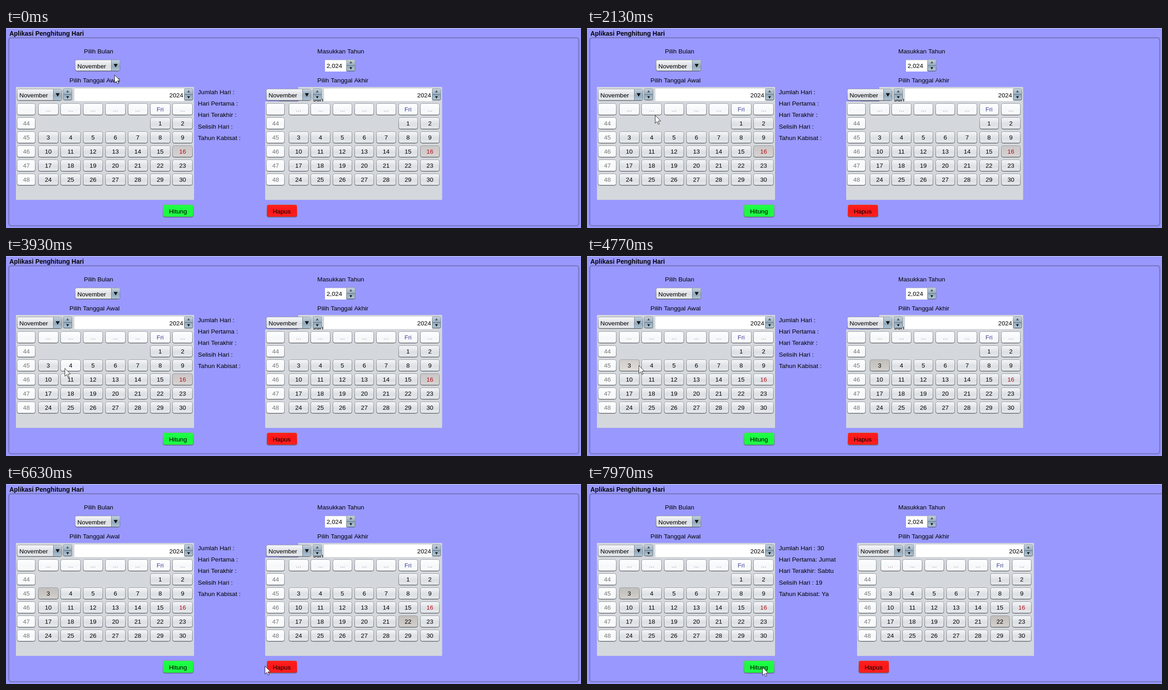
Write an HTML page with a canvas that moves like this. It is 1269 px wide and 441 px high and loops after 8000 ms.

```html
<!DOCTYPE html>
<html lang="id">
<head>
<meta charset="utf-8">
<title>Aplikasi Penghitung Hari</title>
<style>
html, body { margin: 0; width: 1269px; height: 441px; overflow: hidden; background: #9898ff; }
canvas { display: block; }
</style>
</head>
<body>
<canvas id="stage" width="1269" height="441"></canvas>
<script>
const ctx = document.getElementById('stage').getContext('2d');
const LOOP = 8000, START_PICK = 4500, END_PICK = 5900, COUNTED = 7500;
const FONT = '"Liberation Sans", Arial, sans-serif';
const BACK = '#9898ff';

const SKINS = {
  day: ['#f7f8fa', '#dcdfe3', '#e9ecef'],
  pale: ['#ffffff', '#f5f7f9', '#ffffff'],
  hover: ['#ffffff', '#f4f5f7', '#ffffff'],
  today: ['#cbc7c7', '#d2cdcd', '#dad5d5'],
  picked: ['#c1bfbc', '#cac7c3', '#d6d4d0'],
  pickedHover: ['#d0ceca', '#d9d6d2', '#e3e0dc'],
  arrow: ['#c5d3df', '#92a9bb', '#b5cad9'],
  go: ['#20ff4c', '#18fa3e', '#24ff4c'],
  clear: ['#ff2020', '#fb1616', '#ff2424']
};

// Pointer tip: time, x, y
const PATH = [
  [0, 239, 103], [1030, 299, 120], [2130, 150, 192], [3100, 265, 265],
  [4250, 98, 243], [4500, 98, 243], [4770, 114, 241], [5700, 894, 306],
  [5950, 892, 305], [6630, 571, 401], [7200, 386, 404], [8000, 387, 404]
];

function pointerAt(t) {
  const i = PATH.findIndex(p => p[0] > t);
  const [a, b] = [PATH[i - 1], PATH[i]];
  const u = (t - a[0]) / (b[0] - a[0]), k = u * u * (3 - 2 * u);
  return [a[1] + (b[1] - a[1]) * k, a[2] + (b[2] - a[2]) * k];
}

function rect(x, y, w, h, color) {
  ctx.fillStyle = color;
  ctx.fillRect(x, y, w, h);
}

function text(s, x, mid, { align = 'left', color = '#000', size = 13.7, bold = '' } = {}) {
  ctx.font = `${bold} ${size}px ${FONT}`;
  ctx.textAlign = align;
  ctx.fillStyle = color;
  ctx.fillText(s, x, Math.round(mid + 5));
}

function shade(y, h, [top, mid, low]) {
  const g = ctx.createLinearGradient(0, y, 0, y + h);
  g.addColorStop(0, top);
  g.addColorStop(0.55, mid);
  g.addColorStop(1, low);
  return g;
}

function outline(x, y, w, h, r, color, width = 1) {
  ctx.beginPath();
  ctx.roundRect(x, y, w, h, r);
  ctx.lineWidth = width;
  ctx.strokeStyle = color;
  ctx.stroke();
}

// The lowest pixel row is the shadow; edges sit on whole pixels.
function box(left, y, width, h, skin, r = 4) {
  const x = Math.round(left), w = Math.round(left + width) - x;
  outline(x + 0.5, y + 1.5, w - 1, h - 2, r, 'rgba(50,55,65,.35)');
  ctx.beginPath();
  ctx.roundRect(x + 0.5, y + 0.5, w - 1, h - 2, r);
  ctx.fillStyle = shade(y, h, SKINS[skin]);
  ctx.fill();
  ctx.strokeStyle = shade(y, h, ['#989ca3', '#83878d', '#5c6066']);
  ctx.stroke();
}

function triangle(x, y, dir, size = 4, color = '#111') {
  ctx.beginPath();
  ctx.moveTo(x - size, y - dir * size * 0.7);
  ctx.lineTo(x + size, y - dir * size * 0.7);
  ctx.lineTo(x, y + dir * size);
  ctx.fillStyle = color;
  ctx.fill();
}

function combo(x, y, h) {
  box(x, y, 100, h, 'day');
  ctx.beginPath();
  ctx.roundRect(x + 81, y + 1, 18, h - 3, [0, 3, 3, 0]);
  ctx.fillStyle = shade(y, h, SKINS.arrow);
  ctx.fill();
  rect(x + 80, y + 1, 1, h - 3, '#6f8396');
  triangle(x + 90, y + h / 2 - 0.5, 1, 4.5);
  text('November', x + 5.5, y + h / 2 + 0.5);
}

function spinner(x, y) {
  box(x, y, 20, 27, 'arrow', 3);
  rect(x + 1, y + 13, 18, 1, '#5d7182');
  triangle(x + 10, y + 7, -1, 3, '#555');
  triangle(x + 10, y + 19.5, 1, 3);
}

function field(x, y, w, h) {
  rect(x, y, w, h, '#fff');
  rect(x, y, w, 1, '#b9bdc6');
}

function calendar(cal, dx, picked, pointer, stale) {
  const x0 = cal.x + dx;
  rect(x0, 130, cal.w, 249, '#d4d8dc');
  if (stale) residue(x0);
  field(x0 + cal.year, 132, cal.spin - cal.year, 29);
  text('2024', x0 + cal.spin - 2, 147.5, { align: 'right' });
  spinner(x0 + cal.spin, 133);
  spinner(x0 + cal.year - 25, 133);
  combo(x0 + 2, 134, 27);

  for (let row = 0; row < 6; row++) {
    const y = Math.round(166 + row * 30.9), mid = y + 13;
    box(x0 + 2, y, 41, 27, 'pale');
    if (row) text(43 + row, x0 + 23, mid, { align: 'center', color: '#777', size: 13.5 });

    for (let col = 0; col < 7; col++) {
      const x = x0 + cal.first + col * cal.pitch, w = cal.cell;
      const day = row * 7 + col - 11;
      const center = { align: 'center', size: 13.5 };
      if (!row) {
        box(x, y, w, 27, 'pale');
        const color = col === 5 ? '#46469a' : col ? '#77859a' : '#98717d';
        text(col === 5 ? 'Fri' : '...', x + w / 2, mid, { ...center, color });
      } else if (day > 0) {
        const over = pointer[0] >= x && pointer[0] <= x + w + 2 &&
                     pointer[1] >= y && pointer[1] <= y + 27;
        const chosen = day === 16 ? 'today' : over ? 'pickedHover' : 'picked';
        box(x, y, w, 27, day === picked ? chosen : over ? 'hover' : 'day');
        text(day, x + w / 2, mid, { ...center, color: day === 16 ? '#b01018' : '#000' });
      }
    }
  }
}

const LEFT = { x: 22, w: 393, year: 129, spin: 371, first: 49, pitch: 49.4, cell: 44.5 };
const RIGHT = { x: 572, w: 390.5, year: 130, spin: 368, first: 52, pitch: 48.3, cell: 43.5 };

// Unrepainted corner behind the second month chooser
function residue(x) {
  rect(x, 130, 73, 32, BACK);
  rect(x + 31, 161, 42, 1, '#73777d');
  ctx.save();
  ctx.beginPath();
  ctx.rect(x + 106, 156, 22, 6);
  ctx.clip();
  text('Jun', x + 106, 156.5);
  ctx.restore();
}

function drawPointer(x, y) {
  ctx.beginPath();
  [[0, 0], [0, 17.5], [4, 13.8], [6.7, 20], [9.3, 18.8], [6.6, 12.8], [12.2, 12.4]]
    .forEach(([px, py]) => ctx.lineTo(x + 0.5 + px, y + 0.5 + py));
  ctx.closePath();
  ctx.fillStyle = '#fff';
  ctx.fill();
  ctx.lineWidth = 1;
  ctx.strokeStyle = '#222';
  ctx.stroke();
}

function draw(t) {
  const counted = t >= COUNTED, dx = counted ? 24 : 0, pointer = pointerAt(t);
  const begin = t < START_PICK ? 16 : 3;
  const end = t < END_PICK ? begin : 22;

  rect(0, 0, 1269, 441, BACK);
  rect(0, 0, 1269, 1, '#d2d3e4');
  outline(6, 21.5, 1258 + dx, 414.5, 5, '#8585d8', 3);
  outline(6, 21.5, 1258 + dx, 414.5, 5, '#7272b8', 1.2);

  text('Aplikasi Penghitung Hari', 7.5, 12, { bold: 'bold', size: 13.9 });
  text('Pilih Bulan', 172, 51);
  text('Masukkan Tahun', 687, 51);
  text('Pilih Tanggal Awal', 140, 115);
  text('Pilih Tanggal Akhir', 687, 115);
  combo(152, 70, 26);
  field(704, 70, 47, 26);
  text('2,024', 707.5, 83);
  spinner(751, 69);

  const labels = counted
    ? ['Jumlah Hari : 30', 'Hari Pertama: Jumat', 'Hari Terakhir: Sabtu', 'Selisih Hari : 19', 'Tahun Kabisat: Ya']
    : ['Jumlah Hari :', 'Hari Pertama :', 'Hari Terakhir :', 'Selisih Hari :', 'Tahun Kabisat :'];
  labels.forEach((s, i) => text(s, 423.5, 141 + i * 25.2));

  calendar(LEFT, 0, begin, pointer, false);
  calendar(RIGHT, dx, end, pointer, !counted);

  box(346, 389, 68, 29, 'go');
  text('Hitung', 379.5, 404, { align: 'center' });
  box(574.5 + dx, 389, 68, 29, 'clear');
  text('Hapus', 608.5 + dx, 404, { align: 'center' });
  drawPointer(...pointer);
}

const begun = performance.now();
function tick() {
  draw((performance.now() - begun) % LOOP);
  requestAnimationFrame(tick);
}
tick();
</script>
</body>
</html>
```
